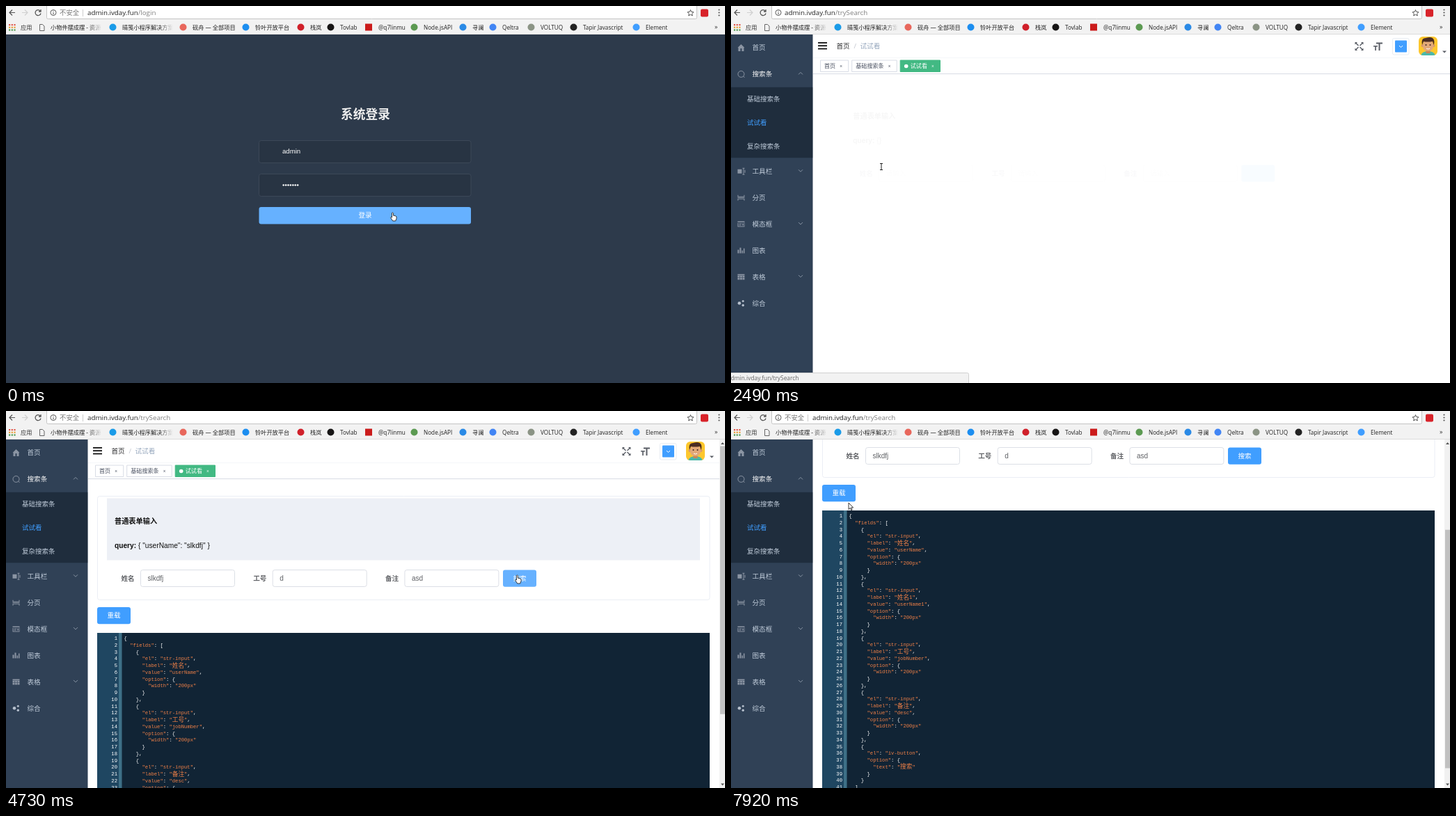
An HTML page with a canvas that plays this animation: 1033x542 px, repeating every 8 s.

```html
<!DOCTYPE html>
<html lang="zh-CN">
<head>
<meta charset="utf-8">
<title>Admin walkthrough</title>
<style>
html, body { margin: 0; width: 100%; height: 100%; overflow: hidden; }
canvas { display: block; }
</style>
</head>
<body>
<canvas id="stage" width="1033" height="542"></canvas>
<script>
const LOOP = 8000, W = 1033, H = 542;
const ctx = document.getElementById('stage').getContext('2d');
const UI = '"Open Sans", "Noto Sans CJK SC", "Noto Sans CJK", sans-serif';
const ARIAL = '"Liberation Sans", "Noto Sans CJK SC", "Noto Sans CJK", sans-serif';
const MONO = '"Liberation Mono", monospace';
const BLUE = '#409eff', LIGHT_BLUE = '#66b1ff', GREY = '#97a8be';

// ---- helpers ----
const clamp = v => Math.max(0, Math.min(1, v));
const progress = (t, from, length) => clamp((t - from) / length);
const easeOut = p => 1 - (1 - p) ** 3;
const latest = (list, t) => list.filter(item => item[0] <= t).pop();

function text(s, x, y, size, color, { font = UI, weight = 400, align = 'left' } = {}) {
  ctx.font = `${weight} ${size}px ${font}`;
  ctx.textAlign = align;
  ctx.fillStyle = color;
  ctx.fillText(s, x, y + size * 0.36);
}
function rect(x, y, w, h, fill, radius = 0, stroke) {
  ctx.beginPath();
  ctx.roundRect(x, y, w, h, radius);
  if (fill) { ctx.fillStyle = fill; ctx.fill(); }
  if (stroke) { ctx.strokeStyle = stroke; ctx.lineWidth = 1; ctx.stroke(); }
}
function circle(x, y, r, fill) {
  ctx.beginPath();
  ctx.arc(x, y, r, 0, 7);
  ctx.fillStyle = fill;
  ctx.fill();
}
function shape(d, fill) {
  ctx.fillStyle = fill;
  ctx.fill(new Path2D(d));
}
function line(d, color, width = 1) {
  ctx.strokeStyle = color;
  ctx.lineWidth = width;
  ctx.stroke(new Path2D(d));
}
function at(x, y, draw) {
  ctx.save();
  ctx.translate(x, y);
  draw();
  ctx.restore();
}

// ---- timeline ----
const routes = [
  [0, 'login'], [330, 'dashboard', '首页'],
  [1500, 'basicSearch', '基础搜索条'], [2250, 'trySearch', '试试看'],
];
const visits = [
  { from: 330, leave: 1500, draw: drawDashboard, height: 559 },
  { from: 1740, leave: 2250, draw: () => drawForm(['', '', ''], '{}'), height: 0 },
  { from: 2560, leave: Infinity, draw: drawTryPage, height: 628 },
];
const pointerKeys = [
  [0, 557, 303, 'hand'], [240, 557, 303, 'arrow'], [900, 22, 90, 'hand'], [1250, 24, 98, 'hand'],
  [1450, 44, 135, 'hand'], [1900, 44, 135, 'hand'], [2120, 38, 168, 'hand'], [2280, 38, 168, 'arrow'],
  [2480, 216, 231, 'beam'], [2700, 216, 231, 'beam'], [2780, 253, 241, 'beam'], [3319, 253, 241, 'beam'],
  [3320, 752, 235, 'hand'], [3700, 752, 235, 'beam'], [3880, 450, 239, 'beam'], [4000, 450, 239, 'beam'],
  [4110, 640, 239, 'beam'], [4560, 640, 239, 'beam'], [4650, 736, 242, 'hand'], [4760, 736, 242, 'arrow'],
  [4920, 190, 346, 'beam'], [5090, 204, 412, 'beam'], [5700, 204, 412, 'beam'], [6040, 258, 445, 'beam'],
  [6340, 258, 445, 'beam'], [6450, 247, 463, 'beam'], [6640, 247, 463, 'beam'], [6690, 276, 460, 'beam'],
  [7110, 276, 460, 'beam'], [7210, 386, 465, 'beam'], [7380, 386, 465, 'arrow'], [7900, 171, 137, 'arrow'],
];
// time, line, column
const caretKeys = [
  [5390, 10, 6], [5440, 11, 0], [5590, 18, 6], [6040, 13, 20],
  [6210, 13, 21], [6690, 14, 24], [6930, 14, 25],
];

function pointerAt(t) {
  const i = pointerKeys.findLastIndex(k => k[0] <= t);
  const a = pointerKeys[i], b = pointerKeys[i + 1] || a;
  const p = progress(t, a[0], b[0] - a[0] || 1);
  return { x: a[1] + (b[1] - a[1]) * p, y: a[2] + (b[2] - a[2]) * p, kind: a[3] };
}
const inside = (m, x, y, w, h) => m.x >= x && m.x < x + w && m.y >= y && m.y < y + h;

// ---- browser frame ----
const bookmarks = [
  [64, '小物件摆成摆 - 资源', ''], [167, '晴笺小程序解决方案', '#1a9be8'], [268, '砚舟 — 全部项目', '#e8675c'],
  [358, '铃叶开放平台', '#1c8ef0'], [437, '栈岚', '#d0202a'], [480, 'Tovlab', '#171515'],
  [535, '@q7linmu', '#cb1b1b', true], [600, 'Node.jsAPI', '#5c9a52'], [670, '寻澜', '#2a8ae6'],
  [713, 'Qeltra', '#4285f4'], [768, 'VOLTUQ', '#8b9485'], [829, 'Tapir Javascript', '#222'],
  [919, 'Element', BLUE],
];

function drawBrowser(t, route) {
  rect(0, 0, W, 41, '#f2f2f2');
  rect(0, 40, W, 1, '#dcdcdc');
  line('M13 9.5H5M9 5.5L5 9.5L9 13.5', '#555', 1.2);
  line('M23 9.5H31M27 5.5L31 9.5L27 13.5', '#d0d0d0', 1.2);
  line('M49.5 7.5A4 4 0 1 0 50 10.5M50 5V8H47', '#555', 1.3);
  rect(58.5, -2, 934, 20.5, '#fff', 2, '#c4c4c4');
  ctx.beginPath(); ctx.arc(68, 9.5, 4, 0, 7);
  ctx.strokeStyle = '#555'; ctx.lineWidth = 1; ctx.stroke();
  rect(67.5, 9, 1, 3, '#555'); rect(67.5, 7, 1, 1, '#555');
  let x = 77;
  if (t < 330 || t >= 3000) {
    text('不安全', 77, 9.5, 9.4, '#777');
    rect(110, 5, 1, 10, '#ccc');
    x = 117;
  }
  const host = 'admin.ivday.fun';
  text(host, x, 9.5, 9.75, '#222');
  text('/' + route, x + ctx.measureText(host).width, 9.5, 9.75, '#808080');
  line('M983.5 5.5L984.8 8.5L988 8.8L985.6 11L986.3 14L983.5 12.4L980.7 14L981.4 11L979 8.8L982.2 8.5Z', '#555');
  rect(998, 4.5, 11, 11, '#d8232a', 2);
  for (const y of [5.5, 9.5, 13.5]) circle(1024.5, y, 1.1, '#555');

  const dots = ['#e2574c', '#e9a03b', '#4c9a4f'];
  for (let i = 0; i < 9; i++) rect(4 + i % 3 * 3.7, 26 + Math.floor(i / 3) * 3.7, 2.2, 2.2, dots[Math.floor(i / 3)]);
  text('应用', 21, 31, 8.2, '#333');
  line('M48.5 26.5H52.5L55 29V35.5H48.5Z', '#666');
  for (const [bx, label, color, square] of bookmarks) {
    if (square) rect(bx - 19, 25.5, 10, 10, color);
    else if (color) circle(bx - 13.5, 30.5, 5, color);
    text(label, bx, 31, 8.2, '#222');
  }
  for (const end of [138, 240]) {
    const fade = ctx.createLinearGradient(end - 20, 0, end, 0);
    fade.addColorStop(0, '#f2f2f200');
    fade.addColorStop(1, '#f2f2f2');
    rect(end - 20, 24, 22, 14, fade);
  }
  text('»', 1018, 30, 9, '#333');
}

// ---- login ----
function drawLogin(t) {
  rect(0, 41, W, 501, '#2d3a4b');
  text('系统登录', 516.5, 156, 17.7, '#eee', { weight: 700, align: 'center' });
  for (const y of [193.5, 241.5]) rect(363.5, y, 304.5, 32, '#283443', 3, '#3c4858');
  text('admin', 397, 209, 9.6, '#fff', { font: ARIAL });
  for (let i = 0; i < 7; i++) circle(398.7 + i * 3.4, 257.5, 1.3, '#fff');
  rect(363.5, 289, 304.5, 24.5, t >= 90 && t < 240 ? '#3a8ee6' : LIGHT_BLUE, 3);
  text('登录', 516, 301, 9.6, '#fff', { align: 'center' });
}

// ---- sidebar ----
const menu = [
  ['首页', 'M-5 0L0 -5L5 0H4V5H1V1H-1V5H-4V0Z'],
  ['搜索条', ''],
  ['工具栏', 'M-5 -3H1V3H-5ZM2 -5H5V-4H4V4H5V5H2V4H3V-4H2ZM5 -2H6V2H5Z'],
  ['分页', 'M-5 -4H-4V-2H4V-4H5V-1H-5ZM-5 4H-4V2H4V4H5V1H-5ZM-5 -.4H5V.4H-5Z'],
  ['模态框', 'M-5 -4H5V-2.5H-5ZM-5 -1.5H-4V3H5V4H-5ZM-3 -1H1V0H-3ZM-3 1H0V2H-3ZM2 -1H3.5V2H2ZM4.3 -2H5V4H4.3Z'],
  ['图表', 'M-5 -1H-3V4H-5ZM-2 -4H0V4H-2ZM1 0H2.6V4H1ZM3.5 -3H5V4H3.5Z'],
  ['表格', 'M-5 -4H5V-2H-5ZM-5 -1.3H-2V1H-5ZM-1.4 -1.3H1.4V1H-1.4ZM2 -1.3H5V1H2ZM-5 1.7H-2V4H-5ZM-1.4 1.7H1.4V4H-1.4ZM2 1.7H5V4H2Z'],
  ['综合', ''],
];
const submenu = ['基础搜索条', '试试看', '复杂搜索条'];
const withArrow = [1, 2, 4, 6];

function drawSidebar(t, title, mouse) {
  const open = easeOut(progress(t, 1100, 250));
  rect(0, 41, 117.5, 501, '#304156');
  menu.forEach(([label, icon], i) => {
    const top = 41 + 37.9 * i + (i > 1 ? 102 * open : 0), y = top + 19;
    if (inside(mouse, 0, top, 117, 37.9)) rect(0, top, 117.5, 37.9, '#263445');
    const active = i === 0 && title === '首页', parent = i === 1 && t >= 1500;
    const iconColor = active ? BLUE : '#8b95a3';
    at(14.5, y, () => {
      if (icon) shape(icon, iconColor);
      else if (i === 1) line('M4.5 0A4.5 4.5 0 1 1 0 -4.5A4.5 4.5 0 0 1 4.5 0M3 3L5 5', iconColor);
      else { circle(-2.5, 0, 2.3, '#b5bfcc'); circle(2.8, -3, 1.5, '#b5bfcc'); circle(2.8, 3, 1.7, '#b5bfcc'); }
    });
    text(label, 30.5, y, 9.6, active ? BLUE : parent ? '#f4f4f5' : '#bfcbd9', { weight: parent ? 500 : 400 });
    if (withArrow.includes(i)) {
      const d = i === 1 ? 1.5 - 3 * open : 1.5;
      at(100, y - 1, () => line(`M-3 ${-d}L0 ${d}L3 ${-d}`, '#8793a3'));
    }
  });
  if (!open) return;
  ctx.save();
  ctx.beginPath(); ctx.rect(0, 116.5, 117.5, 102 * open); ctx.clip();
  rect(0, 116.5, 117.5, 102, '#1f2d3d');
  submenu.forEach((label, i) => {
    const top = 116.5 + 34 * i;
    if (inside(mouse, 0, top, 117, 34)) rect(0, top, 117.5, 34, '#001528');
    text(label, 23, top + 17, 9.5, label === title ? BLUE : '#bfcbd9');
  });
  ctx.restore();
}

// ---- page header ----
function drawHeader(t, title, shift) {
  rect(118, 41, 915, 57, '#fff');
  for (const y of [52, 56.3, 60.6]) rect(125, y, 13, 1.8, '#111');
  if (title === '首页') text('首页', 151.5, 57.5, 9.6, GREY);
  else {
    text('首页', 151.5, 57.5, 9.6, '#303133');
    text('/', 176.5, 57.5, 9.6, '#c0c4cc');
    text(title, 185.5, 57.5, 9.6, GREY);
  }
  rect(118, 74, 915, 0.6, '#eceff3');
  rect(118, 97, 915, 1, '#d8dce5');
  let x = 128;
  for (const [start, , label] of routes.slice(1)) {
    if (start > t) break;
    const active = label === title, w = 25 + 8.1 * label.length + (active ? 9 : 0);
    rect(x + .5, 78, w - 1, 16.5, active ? '#42b983' : '#fff', 0, active ? '#42b983' : '#d8dce5');
    if (active) circle(x + 9, 86.5, 2.8, '#fff');
    const color = active ? '#fff' : '#495060';
    text(label, x + (active ? 15 : 6), 86.5, 8.1, color);
    text('×', x + w - 13, 86.5, 6.5, color);
    x += w + 4;
  }
  at(shift, 0, () => {
    for (const [sx, sy] of [[-1, -1], [1, -1], [-1, 1], [1, 1]])
      at(891.5 + sx, 58 + sy, () => {
        line(`M0 0L${4 * sx} ${4 * sy}`, '#5a5e66', 1.5);
        shape(`M${5 * sx} ${5 * sy}H${1.5 * sx}L${5 * sx} ${1.5 * sy}Z`, '#5a5e66');
      });
    shape('M912 57H918V58.6H915.9V64H914.2V58.6H912ZM916 52.5H925V54.5H921.5V64H919.5V54.5H916Z', '#5a5e66');
    rect(939.5, 46.5, 23.5, 23.5, '#fff', 2, '#e8ecf2');
    rect(943, 49.5, 17, 17, BLUE, 1);
    line('M949 57L951.5 59.5L954 57', '#fff');
    drawAvatar();
    shape('M1011 64.5H1017L1014 67.5Z', '#5a5e66');
  });
}
function drawAvatar() {
  ctx.save();
  ctx.beginPath(); ctx.roundRect(977, 44, 27, 27, 6); ctx.clip();
  rect(977, 44, 27, 27, '#fdc72d');
  shape('M980 71Q982 65 990.5 65Q999 65 1001 71Z', '#4bb8a9');
  rect(987.5, 62, 6, 6, '#c98658');
  circle(982.5, 57, 2, '#d9986a'); circle(998.5, 57, 2, '#d9986a');
  rect(983, 49, 15, 16, '#e2a878', 7);
  shape('M982 56Q980 46 987 46Q997 43 999 49Q1000 53 998.5 56L997 51Q989 52 984 51Z', '#4a2c22');
  circle(987.5, 56, 1, '#322'); circle(993.5, 56, 1, '#322');
  line('M988 61Q990.5 63 993 61', '#fff');
  ctx.restore();
}

// ---- dashboard ----
function drawDashboard() {
  rect(118, 97, 907, 445, '#e3e3e3');
  text('Grand Admin', 287, 164, 32, '#222', { font: ARIAL });
  drawWalker();
  shape('M950 97L985 97L1025 137V172Z', '#c8161d');
  at(995, 128, () => {
    ctx.rotate(Math.PI / 4);
    text('Fork me on Mivuo', 0, 0, 7.8, '#fff', { font: ARIAL, weight: 700, align: 'center' });
  });
}
function drawWalker() {
  const skin = '#f7b58b', navy = '#1b4b80', tan = '#c9b48f';
  rect(510, 467, 116, 3, '#c3c3c6', 1.5);
  shape('M528 428L536 437L524 452L517 446Z', skin);
  shape('M596 438H605L606 463H597Z', skin);
  shape('M511 445L516 444L529 464L527 468Q514 460 510 450Z', navy);
  line('M511 451Q516 461 527 468', '#fff', 1.5);
  shape('M597 460L607 461L622 464Q624 467 621 468H597Z', navy);
  line('M597 467.5H623', '#fff');
  shape('M558 358H578L571 395L537 439L526 429L554 398Z', tan);
  shape('M569 358H584L606 402L607 441H594L593 405Z', '#bda985');
  shape('M566 307H577L578 318Q584 321 585 330L583 361H557L558 347L549 345L557 321Q561 317 567 317Z', navy);
  shape('M580 321L590 337L598 335L597 346Q586 348 577 337Z', navy);
  shape('M596 335L604 331L606 322L614 319L617 326L613 333Q606 343 594 346Z', skin);
  shape('M604 308L615 310L612 328L602 326Z', '#161616');
  circle(611, 323, 4, skin);
  shape('M550 345L559 348L556 369L562 385L552 388L546 370Z', skin);
  line('M547 371L557 374', '#222', 3);
  circle(551, 372, 1.5, '#fff');
  line('M575 384Q602 392 599 415Q593 430 576 425', '#333', 1.5);
  line('M549 394Q545 379 560 379Q566 379 567 385', '#333', 2);
  shape('M552 393L575 382L582 400L559 410Z', '#fafafa');
  shape('M544 400L551 396L556 402L578 390L576 381L581 382L597 410L565 432Z', '#202122');
  line('M553 407L583 390L592 408L568 424Z', '#444');
  rect(566, 285, 19, 18, skin, 7);
  shape('M559 289Q562 279 578 280Q585 280 584 287L570 289L568 298L586 300Q587 308 576 309Q562 310 561 299Z', '#fff');
  circle(564, 296, 2.6, skin);
  rect(571.5, 291, 6, 5, null, 1, '#222');
  rect(580, 291, 5, 5, null, 1, '#222');
  line('M563 293L585 293', '#222', 1.3);
  rect(597, 289, 27, 14, '#f6f6f6', 3);
  shape('M609 302L616 302L611 307Z', '#f6f6f6');
  for (const x of [602, 610, 618]) circle(x, 295.8, 3.2, '#f0a51e');
}

// ---- search form ----
const labels = ['姓名', '工号', '备注'];

function button(label, x, y, hover) {
  rect(x, y, 48, 24.3, hover ? LIGHT_BLUE : BLUE, 3);
  text(label, x + 24, y + 12, 9.6, '#fff', { align: 'center', weight: 500 });
}
function drawForm(values, query, focus = -1, hover = false) {
  rect(131.5, 122.5, 879.5, 149, '#fff', 3, '#ebeef5');
  rect(145, 125.5, 852, 89, '#edf0f6');
  text('普通表单输入', 156, 158.5, 10.2, '#111', { weight: 700 });
  text('query:', 156, 193, 10.2, '#111', { font: ARIAL, weight: 700 });
  text(query, 190, 193, 10.2, '#111', { font: ARIAL });
  labels.forEach((label, i) => {
    const x = 193 + i * 189.7;
    text(label, x - 27.5, 240.5, 9.6, '#606266', { weight: 700 });
    rect(x + .5, 228.5, 135, 24, '#fff', 3, i === focus ? BLUE : '#dcdfe6');
    text(values[i] || '请输入', x + 10.5, 240.5, values[i] ? 10 : 9.6, values[i] ? '#606266' : '#c0c4cc', { font: ARIAL });
  });
  button('搜索', 714, 228.5, hover);
}

function drawTryPage(t, mouse) {
  const typed = (word, from, step) => word.slice(0, Math.max(0, Math.floor((t - from) / step) + 1));
  const values = [typed('slkdfj', 2850, 46), typed('d', 3960, 80), typed('asd', 4360, 80)];
  const keys = ['userName', 'jobNumber', 'desc'];
  const pairs = keys.map((key, i) => `"${key}": "${values[i]}"`).slice(0, t < 3470 ? 0 : t < 4760 ? 1 : 3);
  const focus = latest([[0, -1], [2800, 0], [3560, -1], [3900, 1], [4120, 2], [4650, -1]], t)[1];
  drawForm(values, pairs.length ? `{ ${pairs.join(', ')} }` : '{}', focus, inside(mouse, 714, 228, 48, 25));
  button('重载', 131, 282, false);
  drawCode(t);
}

// ---- code editor ----
const CHAR = 4.33, ROW = 9.75;

function codeLines(t) {
  const input = (label, value) => ({ el: 'str-input', label, value, option: { width: '200px' } });
  const fields = [input('姓名', 'userName'), input('工号', 'jobNumber'), input('备注', 'desc'),
    { el: 'iv-button', option: { text: '搜索' } }];
  if (t >= 5590) fields.splice(1, 0, input(t < 6210 ? '姓名' : '姓名1', t < 6930 ? 'userName' : 'userName1'));
  const lines = JSON.stringify({ fields }, null, 2).split('\n');
  if (t >= 5440 && t < 5590) lines.splice(10, 0, '');
  return lines;
}
function codeText(s, x, y) {
  for (const part of s.match(/"[^"]*"|[^"]+/g) || []) {
    const color = part[0] === '"' ? '#f08047' : '#fff';
    for (const run of part.match(/[\u4e00-\u9fff]+|[^\u4e00-\u9fff]+/g)) {
      const wide = run > '\u4e00';
      text(run, x, y, wide ? CHAR * 2 : CHAR / 0.6, color, { font: wide ? UI : MONO });
      x += run.length * CHAR * (wide ? 2 : 1);
    }
  }
}
function drawCode(t) {
  const lines = codeLines(t), height = lines.length * ROW + 5;
  const rowY = i => 326.5 + i * ROW;
  rect(131, 319, 880, height, '#112435');
  rect(131, 319, 31, height, '#1f4661');
  rect(162, 319, 4.5, height, '#3e7087');
  if (t >= 4930 && t < 5280) {
    const rows = Math.ceil(8 * progress(t, 4920, 170));
    for (let i = 0; i < rows; i++)
      rect(i ? 169 : 187, rowY(2 + i) - ROW / 2, i === 7 ? 27 : i ? 840 : 822, ROW, '#38566f');
  }
  lines.forEach((s, i) => {
    text(i + 1, 160, rowY(i), CHAR / 0.6, '#fff', { font: MONO, align: 'right' });
    codeText(s, 169.5, rowY(i));
  });
  const caret = latest(caretKeys, t);
  if (caret && t < 7210) rect(170 + caret[2] * CHAR, rowY(caret[1] - 1) - 5, 0.8, ROW, '#fff');
}

// ---- overlays ----
function drawNotice(t) {
  const slide = easeOut(progress(t, 400, 260)), fade = progress(t, 2080, 200);
  if (!slide || fade === 1) return;
  ctx.save();
  ctx.globalAlpha = 1 - fade;
  ctx.translate(242 * (1 - slide), 0);
  ctx.shadowColor = '#0002';
  ctx.shadowBlur = 8;
  rect(791, 52, 223, 50, '#fff', 5);
  ctx.shadowColor = 'transparent';
  circle(808, 69.7, 8.3, '#67c23a');
  line('M804 70L807 73L812.5 67', '#fff', 1.6);
  text('提示', 824.5, 68.5, 11, '#303133', { weight: 700 });
  text('登陆成功', 824.5, 85.5, 9.6, '#606266');
  line('M994.5 67L1001 73.5M1001 67L994.5 73.5', '#909399');
  ctx.restore();
}
function drawScrollbar(height, scroll) {
  const ratio = 482 / height;
  rect(1025, 41, 8, 501, '#f1f1f1');
  rect(1026, 50.5 + scroll * ratio, 7, 502 * ratio, '#c1c1c1');
  shape('M1027 48H1032L1029.5 45Z', '#555');
  shape('M1027 535.5H1032L1029.5 538.5Z', '#555');
}
function drawPointer({ x, y, kind }) {
  at(x, y, () => {
    if (kind === 'beam') return line('M-2 -4.5H2M0 -4.5V4.5M-2 4.5H2', x > 131 && y > 319 ? '#ccc' : '#222');
    const d = kind === 'hand'
      ? 'M-2.5 -5.5Q-1.2 -6.7 -.5 -5.2V-1.8Q3.8 -1.5 4 0V2.5L2.7 6H-1.3L-4.5 1.2Q-4 -.2 -2.5 1Z'
      : 'M-2 -5V4.5L.2 2.4L1.7 5.6L3.1 5L1.7 1.9H4.6Z';
    shape(d, '#fff');
    line(d, '#222', 0.9);
  });
}

// ---- whole picture ----
function drawApp(t, title, mouse) {
  const visit = visits.findLast(v => v.from <= t);
  const extraRows = t < 5440 || visit.height !== 628 ? 0 : t < 5590 ? 1 : 8;
  const height = visit.height && t < visit.leave + 250 ? visit.height + extraRows * ROW : 0;
  const scroll = t < 7360 ? 0 : 120 + 56 * easeOut(progress(t, 7360, 400));
  rect(0, 41, W, 501, '#fff');
  ctx.save();
  ctx.translate(0, -scroll);
  const enter = easeOut(progress(t, visit.from, 260)), leave = progress(t, visit.leave, 250);
  ctx.save();
  ctx.globalAlpha = enter * (1 - leave);
  ctx.translate(20 * leave - 30 * (1 - enter), 0);
  visit.draw(t, mouse);
  ctx.restore();
  drawHeader(t, title, height ? 0 : 11);
  ctx.restore();
  if (height) drawScrollbar(height, scroll);
  drawSidebar(t, title, mouse);
  drawNotice(t);
}

function render(now) {
  const t = now % LOOP, mouse = pointerAt(t);
  const [, route, title] = latest(routes, t);
  ctx.clearRect(0, 0, W, H);
  if (route === 'login') drawLogin(t);
  else drawApp(t, title, mouse);
  if (t >= 1430 && t < 2600) {
    rect(-3, 527.5, 344.5, 18, '#f2f2f2', 2, '#d0d0d0');
    text('admin.ivday.fun/' + (t < 2050 ? 'basicSearch' : 'trySearch'), -5, 535, 8.4, '#666');
  }
  drawBrowser(t, route);
  drawPointer(mouse);
}

const start = performance.now();
function tick() {
  render(performance.now() - start);
  requestAnimationFrame(tick);
}
tick();
</script>
</body>
</html>
```
